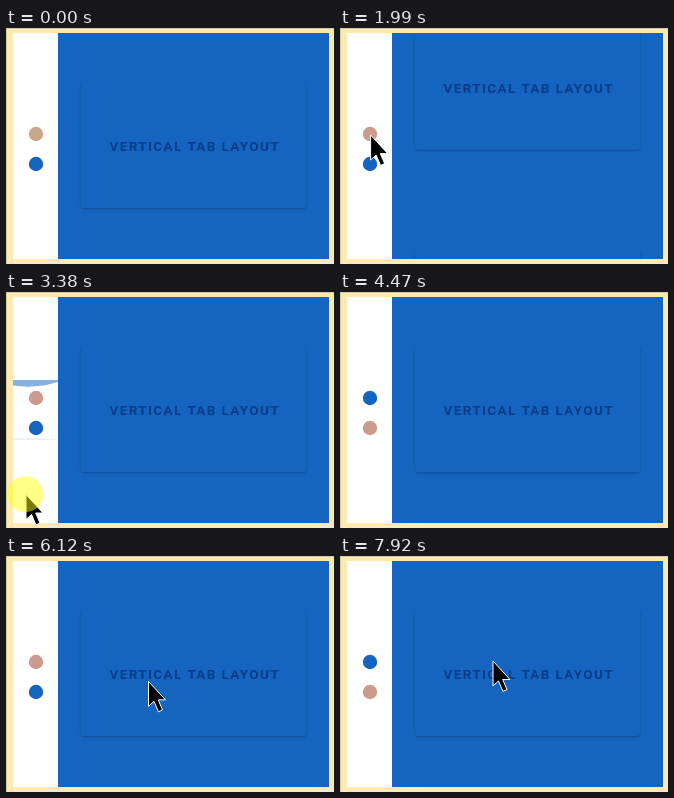
Animation of 328x236 px, one loop 7.99 s. Source, as an HTML page with a canvas:

```html
<!DOCTYPE html>
<html lang="en">
<head>
<meta charset="utf-8">
<title>Vertical tab layout</title>
<style>
  html, body { margin: 0; height: 100%; overflow: hidden; background: #ffebb2; }
  canvas { display: block; }
</style>
</head>
<body>
<canvas id="stage" width="328" height="236"></canvas>
<script>
const ctx = document.getElementById('stage').getContext('2d');
const LOOP = 7990, PAGE = 225;
const BLUE = '#1565c0', ROSE = '#cb9b8e', TAN = '#cca58d', INK = '#073c8b';

// Moments when the selected tab flips.
const flips = [1100, 1731, 4300, 4850, 7700];

// Eased progress from 0 to 1.
function ease(t, start, duration) {
  const u = Math.min(1, Math.max(0, (t - start) / duration));
  return u * u * (3 - 2 * u);
}

const scroll = t => (t >= 1100) - ease(t, 1731, 390) + ease(t, 4205, 270)
  - ease(t, 4750, 575) + ease(t, 6597, 410);

const between = (t, a, b) => t >= a && t < b;

const pressed = t => between(t, 1060, 1200) || between(t, 1700, 1905)
  || between(t, 2400, 3500) || between(t, 6640, 6980);

function pointerAt(t) {
  let x = 91, y = 242;
  const glide = (start, duration, toX, toY) => {
    const e = ease(t, start, duration);
    x += (toX - x) * e;
    y += (toY - y) * e;
  };
  glide(250, 570, 25, 137);        // enter, click the lower tab
  glide(1250, 350, 30.6, 107);     // click the upper tab
  glide(2400, 490, 23, 58);        // drag the strip up, then down
  glide(3050, 330, 20, 202.5);
  glide(3440, 560, 138, 242);      // leave, come back elsewhere
  glide(4000, 1600, 212, 242);
  glide(5670, 350, 140, 86);
  glide(6020, 250, 147, 196);
  glide(6630, 341, 144.5, 44);     // swipe the page
  glide(7640, 270, 153, 105);
  return [x, y];
}

function rect(color, x, y, w, h) {
  ctx.fillStyle = color;
  ctx.fillRect(x, y, w, h);
}

function disc(color, x, y, r) {
  ctx.fillStyle = color;
  ctx.beginPath();
  ctx.arc(x, y, r, 0, 7);
  ctx.fill();
}

function card(y) {
  ctx.save();
  ctx.shadowColor = 'rgba(0,0,0,.27)';
  ctx.shadowBlur = 2.5;
  ctx.shadowOffsetY = 1;
  ctx.fillStyle = BLUE;
  ctx.beginPath();
  ctx.roundRect(75, y + 55, 225, 125, 3);
  ctx.fill();
  ctx.restore();
  ctx.fillStyle = INK;
  ctx.font = 'bold 13.5px Roboto, sans-serif';
  ctx.letterSpacing = '1.37px';
  ctx.fillText('VERTICAL TAB LAYOUT', 103.5, y + 123);
}

// Overscroll glow hanging from one edge of the tab strip.
function glow(edge, dir, k) {
  if (k <= 0) return;
  ctx.fillStyle = `rgba(21,101,192,${.5 * Math.sqrt(k)})`;
  ctx.beginPath();
  ctx.moveTo(7, edge);
  ctx.lineTo(52, edge);
  ctx.lineTo(52, edge + dir * 2 * k);
  ctx.quadraticCurveTo(30, edge + dir * 9 * k, 7, edge + dir * 5.5 * k);
  ctx.fill();
}

function pointer(t) {
  ctx.save();
  ctx.translate(...pointerAt(t));
  ctx.beginPath();
  [[0, 0], [0, 25], [5.5, 20], [10, 30.5], [14, 28.5], [9.7, 18.5], [17, 18.5]]
    .forEach(p => ctx.lineTo(...p));
  ctx.closePath();
  ctx.fillStyle = '#000';
  ctx.fill();
  ctx.strokeStyle = '#fff';
  ctx.stroke();
  if (pressed(t)) disc('rgba(255,255,0,.48)', -.7, -.3, 18);
  ctx.restore();
}

function draw(t) {
  rect('#d6caa3', 0, 0, 328, 236);
  rect('#ffebb2', 1, 1, 327, 235);
  rect('#fff', 7, 5, 45, 226);
  rect(BLUE, 52, 5, 271, 226);

  ctx.save();
  ctx.beginPath();
  ctx.rect(52, 5, 271, 226);
  ctx.clip();
  const y = -PAGE * scroll(t);
  card(y);
  card(y + PAGE);
  ctx.restore();

  const second = flips.filter(f => t >= f).length % 2;
  const active = t < flips[0] ? TAN : ROSE;
  disc(second ? BLUE : active, 30, 106, 7.2);
  disc(second ? active : BLUE, 30, 136, 7.2);
  glow(88, 1, ease(t, 3090, 280) - ease(t, 3550, 470));
  glow(147.5, -1, ease(t, 2440, 410) - ease(t, 3080, 400));
  pointer(t);
}

function tick() {
  draw(performance.now() % LOOP);
  requestAnimationFrame(tick);
}
tick();
</script>
</body>
</html>
```
